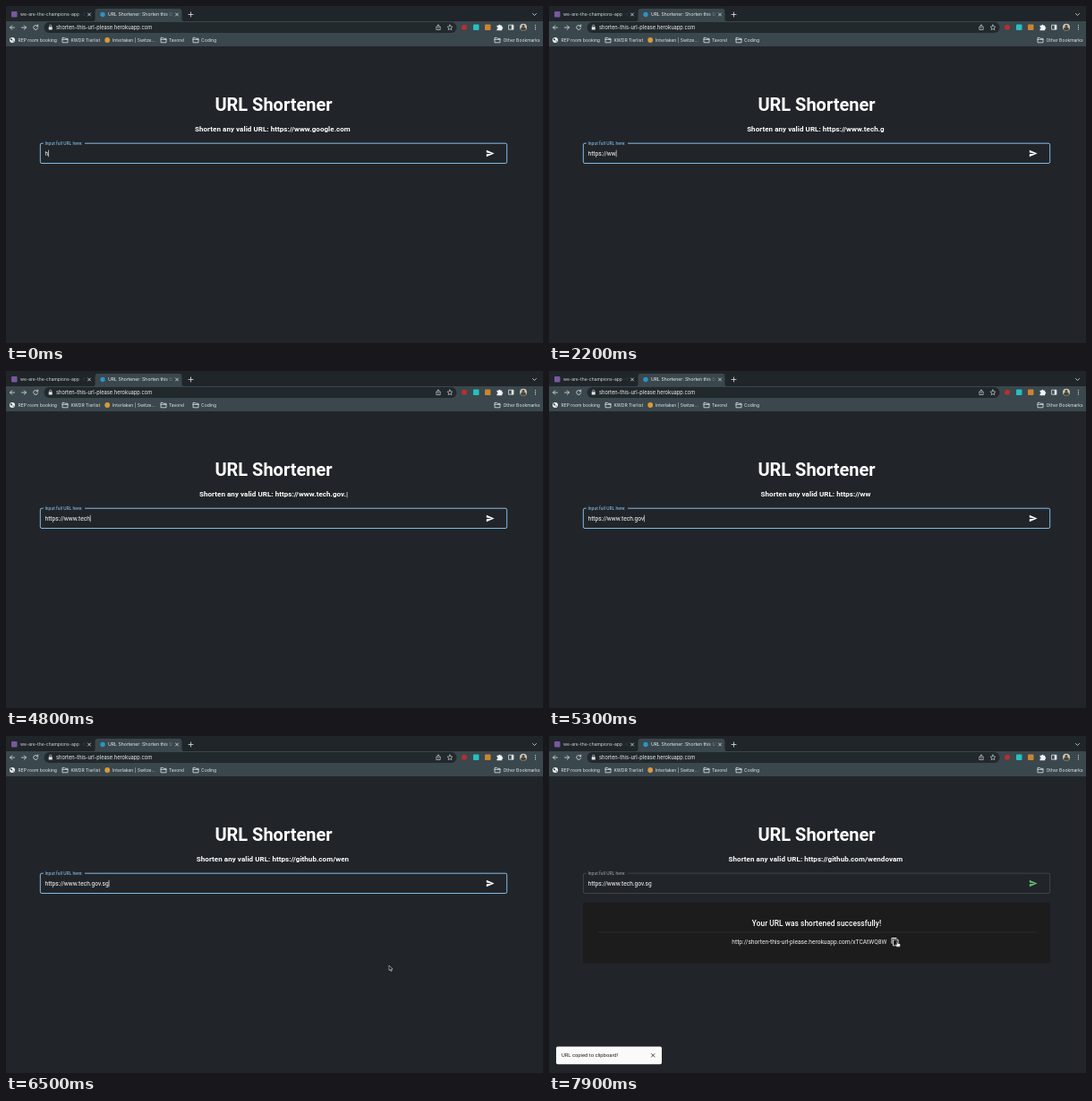
An HTML page that plays this animation: 600 by 376 pixels, repeating every 8 s.

```html
<!DOCTYPE html>
<html lang="en">
<head>
<meta charset="utf-8">
<title>URL Shortener</title>
<style>
html, body { margin: 0; width: 100%; height: 100%; overflow: hidden; background: #212529; }
svg { display: block; width: 600px; height: 376px; }
text { font-family: Roboto, sans-serif; fill: #fff; white-space: pre; }
.ui text { font-family: Inter, sans-serif; font-size: 5px; fill: #e4e8ea; }
.line { fill: none; stroke: #dfe4e6; stroke-width: .8; stroke-linecap: round; stroke-linejoin: round; }
#frame { fill: none; }
</style>
</head>
<body>
<svg viewBox="0 0 600 376">
  <defs>
    <linearGradient id="fadeA" gradientUnits="userSpaceOnUse" x1="80" x2="89" y1="0" y2="0">
      <stop stop-color="#d3d8da"/><stop offset="1" stop-color="#d3d8da" stop-opacity="0"/>
    </linearGradient>
    <linearGradient id="fadeB" gradientUnits="userSpaceOnUse" x1="178" x2="188" y1="0" y2="0">
      <stop stop-color="#eef1f2"/><stop offset="1" stop-color="#eef1f2" stop-opacity="0"/>
    </linearGradient>
    <g id="folder" class="line">
      <path d="M-3 2.4v-5h2.3l.8.9h2.9v4.1zM-3-.6h6"/>
    </g>
    <path id="cross" class="line" d="M-1.5-1.5l3 3m0-3l-3 3"/>
  </defs>
  <rect width="600" height="376" fill="#212529"/>

  <g class="ui">
    <rect width="600" height="17" fill="#1f2528"/>
    <path d="M97 17q2.500 0 2.500-2.500V6q0-3 3-3H193.500q3 0 3 3v8.500q0 2.500 2.500 2.500z" fill="#3a474d"/>
    <rect y="17" width="600" height="28" fill="#3a474d"/>
    <rect x="6" y="6" width="6.500" height="6.500" rx="1" fill="#79589f"/>
    <circle cx="108" cy="9.500" r="2.700" fill="#2a93c4"/>
    <text x="16" y="11.300" style="fill:url(#fadeA)">we-are-the-champions-app · C</text>
    <text x="114" y="11.300" style="fill:url(#fadeB);font-size:5.100px">URL Shortener: Shorten this U</text>
    <use href="#cross" x="93" y="9.500"/>
    <use href="#cross" x="191" y="9.500"/>
    <path class="line" d="M204 9.500h5m-2.500-2.500v5M588.500 8.500l2 2 2-2"/>

    <rect x="42.500" y="18" width="461" height="12" rx="6" fill="#22292d"/>
    <path class="line" d="M9.500 24h-5m2.300-2.300L4.500 24l2.300 2.300M17.500 24h5m-2.300-2.300l2.300 2.300-2.300 2.300"/>
    <path class="line" d="M35.300 22.500a2.500 2.500 0 1 0 .3 2.200M35.700 21v1.800h-1.800"/>
    <rect x="47.700" y="23.200" width="4" height="3.300" rx=".5" fill="#dfe4e6"/>
    <path class="line" d="M48.600 23v-.8a1.100 1.100 0 0 1 2.200 0v.8" style="stroke-width:.6"/>
    <text x="56" y="26" style="font-size:5.740px;fill:#f0f2f3">shorten-this-url-please.herokuapp.com</text>
    <path class="line" style="stroke-width:.6" d="M481.800 23h-1v3.500h4.400V23h-1m-1.200 2v-4m-1.200 1.100l1.200-1.200 1.200 1.200"/>
    <path class="line" style="stroke-width:.6" d="M496 21l.9 1.900 2 .3-1.500 1.400.4 2-1.800-1-1.800 1 .4-2-1.500-1.400 2-.3z"/>
    <circle cx="512" cy="23.700" r="3" fill="#b4312f"/>
    <rect x="522" y="20.500" width="6.500" height="6.500" rx="1" fill="#25c0c2"/>
    <rect x="535" y="20.500" width="6.500" height="6.500" rx="1" fill="#c98530"/>
    <path d="M548.500 21.800h1.800a1.100 1.100 0 0 1 2.200 0h1.700v1.700a1.100 1.100 0 0 1 0 2.200v1.500h-5.700v-1.700a1 1 0 0 0 0-2z" fill="#f1f3f4"/>
    <rect class="line" x="562" y="21.200" width="5" height="5"/>
    <rect x="564.700" y="21.200" width="2.300" height="5" fill="#dfe4e6"/>
    <circle cx="578" cy="23.700" r="4" fill="#cfc8b8"/>
    <path d="M575 26.300a3 3 0 0 1 6 0a4 4 0 0 1-6 0z" fill="#4b4338"/>
    <circle cx="578" cy="22.300" r="1.400" fill="#4b4338"/>
    <g fill="#dfe4e6">
      <circle cx="591.500" cy="21.500" r=".6"/><circle cx="591.500" cy="23.700" r=".6"/><circle cx="591.500" cy="25.900" r=".6"/>
    </g>

    <circle cx="7" cy="38" r="3" fill="#eef1f2"/>
    <path d="M5 36l2.200 1-.6 1.400L5 38zM7.500 38.500l1.500.2-1 1.500z" fill="#3a474d"/>
    <circle cx="113.200" cy="38" r="2.900" fill="#d9993a"/>
    <use href="#folder" x="66" y="38"/>
    <use href="#folder" x="176" y="38"/>
    <use href="#folder" x="212" y="38"/>
    <use href="#folder" x="549" y="38"/>
    <text x="13.500" y="39.800">REP room booking</text>
    <text x="72.500" y="39.800">KWDR Tierlist</text>
    <text x="119" y="39.800">Interlaken | Switze…</text>
    <text x="182" y="39.800">Tavorel</text>
    <text x="218" y="39.800">Coding</text>
    <text x="555.500" y="39.800">Other Bookmarks</text>
  </g>

  <text x="299" y="117" text-anchor="middle" font-size="20" font-weight="700">URL Shortener</text>
  <text x="299" y="139.800" text-anchor="middle" font-size="8" font-weight="700" letter-spacing=".06"><tspan id="slogan"></tspan><tspan id="bar">|</tspan></text>

  <path id="frame" d="M88 153.200H558a1.700 1.700 0 0 1 1.700 1.700V173.800a1.700 1.700 0 0 1-1.700 1.700H40a1.700 1.700 0 0 1-1.700-1.700V154.900a1.700 1.700 0 0 1 1.700-1.700h1.700"/>
  <text id="label" x="43.500" y="154.800" font-size="5">Input full URL here:</text>
  <text id="field" x="43.500" y="166.800" font-size="6.600"></text>
  <path id="caret" d="M0 160.700v7.600" stroke="#fff" stroke-width=".6"/>
  <path id="send" transform="translate(536 159.400) scale(.417)" d="M2 21L23 12 2 3v7l15 2-15 2z"/>

  <g id="panel">
    <rect x="38" y="185.500" width="522" height="68" rx="1.700" fill="#1c1c1d"/>
    <text x="299" y="211.900" text-anchor="middle" font-size="8.330" font-weight="500" letter-spacing=".06">Your URL was shortened successfully!</text>
    <path d="M54.500 219h490" stroke="#fff" stroke-opacity=".13" stroke-width=".5"/>
    <text x="204.300" y="232" font-size="6.670" fill-opacity=".93">http://shorten-this-url-please.herokuapp.com/xTCAtWQ8W</text>
    <path transform="translate(381.700 224.700) scale(.417)" fill="#fff" d="M16 1H4a2 2 0 0 0-2 2v14h2V3h12zM19 5H8a2 2 0 0 0-2 2v14a2 2 0 0 0 2 2h11a2 2 0 0 0 2-2V7a2 2 0 0 0-2-2zm0 16H8V7h11z"/>
  </g>

  <g id="toast">
    <rect x="8" y="346.500" width="118" height="19.700" rx="1.700" fill="#fafafa"/>
    <text x="14" y="358.300" font-size="5.830" style="fill:#222">URL copied to clipboard!</text>
    <path d="M114.200 354.300l4 4m0-4l-4 4" stroke="#222" stroke-width=".8"/>
  </g>

  <g id="mouse" stroke="#fff" stroke-width=".5" stroke-linejoin="round">
    <path id="arrow" fill="#111" d="M0 0v5.600l1.300-1.200.9 2.100 1-.4-.9-2h1.800z"/>
    <path id="hand" fill="#fff" stroke="#222" d="M-.6.500q.6-.8 1.200 0v2.300l2.500.6q.6.300.5 1l-.5 2.300H-.6L-2.300 4.300q.4-.8 1.700.2z"/>
  </g>
</svg>
<script>
const LOOP = 8000;
const el = id => document.getElementById(id);
const show = (id, on) => { el(id).style.visibility = on ? 'visible' : 'hidden'; };

const links = ['https://www.google.com', 'https://www.tech.gov.sg/', 'https://github.com/wendovam'];
// start, link, first length, last length, ms per character
const runs = [
  [0, 0, 22, 22, 50],
  [1230, 0, 22, 12, 48],
  [1710, 1, 12, 24, 78],
  [4630, 1, 24, 8, 47],
  [5382, 2, 8, 27, 78]
];

const typed = 'https://www.tech.gov.sg';
const keys = [0, 200, 300, 400, 500, 600, 900, 1100, 1700, 2000, 2400, 2700,
  4300, 4400, 4600, 4700, 4900, 5000, 5100, 5200, 5500, 5700, 5800];

const DONE = 6600, CLICK = 7400, TOAST = 7500;
// time, x, y
const path = [[6500, 428, 256], [6900, 404, 216], [7300, 389, 228.500], [8000, 389, 228.500]];

function slogan(t) {
  const [start, link, from, to, step] = runs.filter(r => r[0] <= t).pop();
  const n = Math.min(Math.abs(to - from), Math.floor((t - start) / step));
  return links[link].slice(0, from + Math.sign(to - from) * n);
}

function caretOn(t) {
  return t < CLICK && !(t >= 3200 && t < 3700) && !(t >= 4000 && t < 4300);
}

function moveMouse(t) {
  show('mouse', t >= path[0][0]);
  if (t < path[0][0]) return;
  const i = path.findIndex(p => p[0] > t);
  const [a, b] = [path[i - 1], path[i]];
  const k = (t - a[0]) / (b[0] - a[0]);
  const e = k * k * (3 - 2 * k);
  const at = j => a[j] + (b[j] - a[j]) * e;
  el('mouse').setAttribute('transform', `translate(${at(1)} ${at(2)})`);
  el('arrow').style.display = t < 7250 ? '' : 'none';
  el('hand').style.display = t < 7250 ? 'none' : '';
}

function draw(t) {
  el('slogan').textContent = 'Shorten any valid URL: ' + slogan(t);
  const beat = t % 1070;
  el('bar').style.fillOpacity = beat >= 485 && beat < 1020 ? 1 : 0;

  el('field').textContent = typed.slice(0, keys.filter(k => k <= t).length);
  const x = 43.900 + el('field').getComputedTextLength();
  el('caret').setAttribute('transform', `translate(${x} 0)`);
  show('caret', caretOn(t));

  const done = t >= DONE, blurred = t >= CLICK;
  const tint = done ? '#66bb6a' : '#90caf9';
  el('frame').style.stroke = blurred ? '#565a5d' : tint;
  el('frame').style.strokeWidth = blurred ? .6 : .9;
  el('label').style.fill = blurred ? '#a3a6a8' : tint;
  el('send').style.fill = done ? '#66bb6a' : '#fff';
  show('panel', done);

  const grow = 1 - (1 - Math.min(1, Math.max(0, (t - TOAST) / 220))) ** 3;
  const s = .75 + .25 * grow;
  el('toast').style.opacity = grow;
  el('toast').setAttribute('transform', `translate(67 356.300) scale(${s}) translate(-67 -356.300)`);
  moveMouse(t);
}

const origin = performance.now();
function tick() {
  draw((performance.now() - origin) % LOOP);
  requestAnimationFrame(tick);
}
tick();
</script>
</body>
</html>
```
